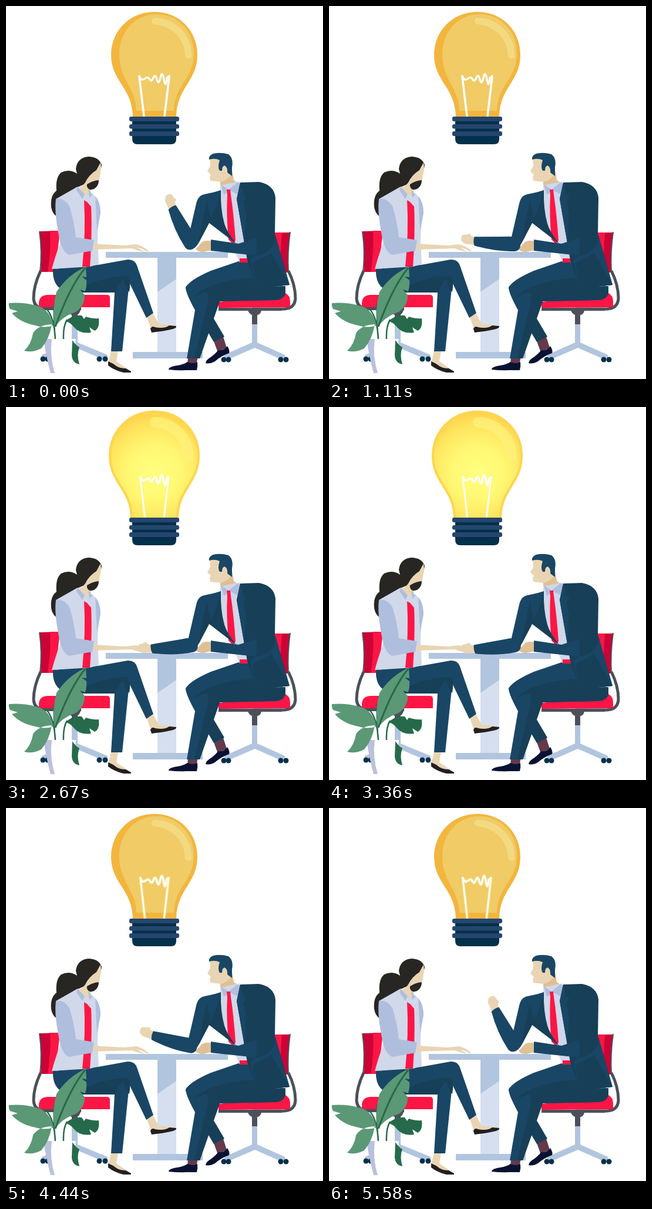
An HTML page for the animation above (5.61 s loop, 540 by 634 pixels).

```html
<!DOCTYPE html>
<html lang="en">
<head>
<meta charset="utf-8">
<title>Agreement</title>
<style>
html, body { margin: 0; width: 100%; height: 100%; overflow: hidden; background: #fff }
svg { display: block; width: 100%; height: 100% }
.navy { fill: #194665 } .deep { fill: #173f58 } .ink { fill: #03304a } .night { fill: #0a1232 }
.red { fill: #fd1645 } .wine { fill: #cb0336 }
.steel { fill: #b2c5df } .pale { fill: #d0d8ea } .shade { fill: #b0bedd }
.skin { fill: #e9d5b3 } .tan { fill: #dfc094 } .hair { fill: #272623 }
.gray { fill: #4b505a } .shoe { fill: #231f20 } .sock { fill: #633a4b }
.leaf { fill: #5b9876 } .dark { fill: #266a4b }
.frame { fill: none; stroke: #4b505a; stroke-width: 5; stroke-linejoin: round }
.edge { fill: none; stroke: #4b505a; stroke-width: 2 }
.wire { fill: none; stroke: #fff; stroke-linejoin: round; stroke-linecap: round }
</style>
</head>
<body>
<svg viewBox="0 0 540 634">
<defs>
  <path id="glass" d="M253 10C296 10 326 43 326 83C326 128 291 138 290 188H216C215 138 179 128 179 83C179 43 210 10 253 10Z"/>
  <path id="shine" d="M252 20C289 20 319 51 316 88Q311 92 305 87C305 56 284 34 251 31Q244 25 252 20Z"/>
  <path id="legs" d="M235 187L227 120M278 120L270 187"/>
  <path id="coil" d="M227 119Q230 126 233 125T239 122T245 125T251 122T257 125T263 122T269 125T274 122L278 119"/>
  <radialGradient id="glow" gradientUnits="userSpaceOnUse" cx="253" cy="112" r="98">
    <stop offset="0" stop-color="#ffff80"/><stop offset=".45" stop-color="#fff873"/>
    <stop offset=".8" stop-color="#ffe65f"/><stop offset="1" stop-color="#fed64f"/>
  </radialGradient>
</defs>

<!-- table -->
<path class="steel" d="M216 588H335V599H216Z"/>
<path fill="#d5dfef" d="M258 428H290V588H258Z"/>
<path class="steel" d="M170 418H378V428H290V464L258 486V428H170Z"/>

<!-- left chair -->
<path class="wine" d="M57 383L91 382L84 452H59Q62 418 57 383Z"/>
<path class="red" d="M75 382H92L84 452H71Q77 416 75 382Z"/>
<path class="edge" d="M57 383Q62 418 58 452"/>
<path class="frame" d="M59 450Q47 475 47 497Q48 514 66 514.500H128"/>
<path class="red" d="M56 512V504Q57 492 70 491H172Q177 491 177 496V512Z"/>
<path class="gray" d="M90 512H128Q126 526 117 526Q108 526 105 517H90ZM112 524H122V543H112Z"/>
<path class="steel" d="M112 541H122V572L173 593V599H162L117 580L72 599H61V593L112 572Z"/>
<g class="ink"><circle cx="63" cy="600" r="4.500"/><circle cx="71" cy="600" r="4.500"/><circle cx="159" cy="600" r="4.500"/><circle cx="169" cy="600" r="4.500"/></g>

<!-- right chair -->
<path class="red" d="M456 385H484Q479 420 481 453H460Z"/>
<path class="wine" d="M470 385H484Q479 420 481 453H468Q467 420 470 385Z"/>
<path class="edge" d="M484 384Q479 420 481 453"/>
<path class="frame" d="M481 450Q493 474 493 497Q492 514 474 515H420"/>
<path class="red" d="M362 513V503L400 499L476 488Q484 492 484 502V512Z"/>
<path class="gray" d="M362 513H470V518H435Q433 526 424 526Q416 526 412 518H362ZM419 524H428V543H419Z"/>
<path class="steel" d="M419 541H428V572L475 593V599H465L424 581L382 599H372V593L419 572Z"/>
<g class="ink"><circle cx="371" cy="601" r="4.500"/><circle cx="379" cy="601" r="4.500"/><circle cx="468" cy="601" r="4.500"/><circle cx="477" cy="601" r="4.500"/></g>

<!-- woman: legs -->
<path class="skin" d="M240 529L251 523L260 540L288 543L286 548L247 549ZM179 586H191L188 604L208 618L200 621L174 607Z"/>
<path class="shoe" d="M246 549Q248 543 254 546Q270 549 278 543L290 544Q291 548 280 550Q260 554 248 555ZM174 604Q182 607 188 612Q194 616 204 616L213 621V623H200Q184 619 174 611Z"/>
<path class="navy" d="M80 447L157 440L207 431Q219 430 223 441L251 522L239 530L210 470L198 587H179L185 487H110Q78 482 80 447Z"/>
<path class="deep" d="M120 487Q145 463 203 459Q212 458 211 478L210 486L206 482L200 465Q190 470 186 487Z"/>

<!-- woman: head -->
<path class="hair" d="M121 285Q108 276 94 283Q84 291 86 314Q75 322 77 342Q80 357 91 359Q85 340 89 329Q108 321 122 308L140 300Q162 285 163 270Q158 256 140 256Q121 258 119 277Z"/>
<path class="skin" d="M161 266Q163 277 161 283L158 299L145 312L143 335L133 328L124 308Q130 307 135 300Q141 287 154 279Z"/>
<path class="hair" d="M138 303Q147 297 158 296Q158 306 150 311Q142 314 139 309Q137 306 138 303Z"/>

<!-- woman: jacket -->
<path class="pale" d="M85 328L122 307L134 322L147 318Q161 333 161 352Q156 375 156 398L158 439L143 443L78 447Q84 425 94 397Z"/>
<path class="shade" d="M122 307L134 320L130 328L120 313ZM140 311L147 321L142 326ZM152 323Q161 333 161 352L155 382Z"/>
<path class="red" d="M133 330L138 333L145 341Q147 385 143 443H130Q136 385 133 330Z"/>
<path class="skin" d="M149 404L202 407L222 405Q236 409 243 417L239 417Q231 411 224 411L236 418Q224 416 214 412L149 414Z"/>
<path class="shade" d="M85 328Q98 325 108 340Q116 365 119 393L150 398L147 416L108 423Q95 419 90 390Q82 350 85 328Z"/>

<!-- man: legs -->
<path class="sock" d="M354 570L370 562L376 581L361 589ZM310 596H327L324 610H309Z"/>
<path class="night" d="M377 578Q382 586 380 590Q366 595 356 604Q347 609 340 607Q340 602 350 596Q358 590 361 585Q371 587 377 578ZM326 605Q327 612 325 619H306Q294 620 277 618Q277 613 292 611Q303 609 309 605Q318 609 326 605Z"/>
<path class="deep" d="M306 478Q318 473 342 490L352 528L372 562L354 571Q328 528 314 500Q307 488 306 478Z"/>
<path class="navy" d="M306 478Q314 465 349 450L396 434H418L430 478L476 476V488Q473 500 456 500L364 502L330 599H308L322 517Q307 490 306 478Z"/>
<path class="deep" d="M318 495Q350 466 420 462L432 478L476 476V488Q473 500 456 500L364 502L330 599H321L343 506Q348 485 338 487Z"/>

<!-- man: head -->
<path class="tan" d="M365 282H386L388 296L396 301L379 312L365 304Z"/>
<path class="skin" d="M347 258L379 262L386 284Q378 296 366 299L348 297L347 290L349 287L343 281L348 272Z"/>
<path class="navy" d="M346 261Q345 254 353 251Q365 248 379 252Q388 259 385 274V289L377 283Q378 274 372 271Q368 274 368 280H364Q360 274 364 262Q356 258 346 261Z"/>
<path class="skin" d="M369 273Q376 271 375 279Q373 285 368 283Z"/>

<!-- man: body -->
<path class="pale" d="M365 305L398 298L408 370L413 436H398L366 360Z"/>
<path class="red" d="M398 429H414V436H398Z"/>
<path class="shade" d="M366 303L379 312L394 300L399 303L394 320L381 313L371 321Z"/>
<path class="red" d="M376 312H382L383 321Q388 355 391 398L387 405L379 397Q375 355 377 322Z"/>
<path class="deep" d="M399 300L431 299Q457 304 459 326L458 388L483 474L428 480L411 432L406 403L393 328Z"/>
<path class="navy" d="M399 300L405 321L410 325L404 332L409 354L406 403L393 328ZM416 432L459 389L483 474L428 480Z"/>
<path class="deep" d="M420 437L452 420L483 474L428 480Z"/>
<path class="deep" d="M366 313L337 322Q325 350 345 368L392 404Q376 384 372 370Q365 345 366 313Z"/>
<path class="navy" d="M366 314L338 320Q327 322 324 336L311 392Q310 406 318 412Q325 410 329 401L347 366Q360 340 366 314Z"/>
<path class="deep" d="M342 331L349 362L345 371L328 403Q333 374 342 331Z"/>
<path class="tan" d="M323 413L334 401Q342 397 350 400V415L336 418Q326 418 323 413Z"/>
<path class="navy" d="M349 397L396 404L440 390L452 406Q442 424 425 424L349 416Z"/>
<path class="deep" d="M425 391Q442 370 457 360L458 400Q448 424 425 424Q430 408 425 391Z"/>

<!-- man: moving forearm -->
<g id="arm">
  <path class="skin" d="M249 398L242 396L239 392L234 394L227 395Q223 400 226 406L232 410L249 411Z"/>
  <path class="navy" d="M247 397L301 393Q322 390 326 402Q327 409 325 412Q322 417 316 417Q284 420 248 412Q245 405 247 397Z"/>
</g>

<!-- plant -->
<path fill="#fff" d="M64 566H119L113 624H76Z"/>
<path fill="#bac1dd" d="M64 566H78Q74 595 83 624H76Q68 595 64 566Z"/>
<path fill="none" stroke="#266a4b" stroke-width="2.500" d="M70 516Q82 530 84 566M82 505Q81 540 84 566M104 533Q97 545 98 566"/>
<path class="leaf" d="M5 505Q30 503 54 510Q74 515 81 543Q66 548 50 543Q24 538 10 522L20 519L7 515Q4 510 5 505ZM78 541Q55 542 46 556Q43 575 31 586Q45 590 60 582Q74 566 78 541Z"/>
<path class="leaf" d="M136 443Q105 457 86 486Q78 515 83 546Q95 528 119 520Q135 508 134 491L126 482L135 485Q138 475 137 466L129 460L137 461Z"/>
<path fill="none" stroke="#266a4b" stroke-width="3" d="M135 445Q108 478 84 545"/>
<path class="dark" d="M101 536Q114 524 129 526L133 532L136 528Q149 532 158 531Q160 548 151 552L142 546L145 555Q126 558 116 546Q109 537 101 536ZM113 568Q119 577 125 580Q120 593 125 609Q113 607 112 594Z"/>

<!-- bulb -->
<use href="#glass" fill="#f2b63e"/>
<path fill="#f0cb66" d="M256 14C293 14 320 43 320 80C320 125 287 133 286 178H222C222 140 193 126 193 82C193 43 220 14 256 14Z"/>
<use href="#shine" fill="#f3da80"/>
<g id="lit">
  <use href="#glass" fill="none" stroke="#fed54f" stroke-width="8"/>
  <use href="#glass" fill="url(#glow)"/>
  <use href="#shine" fill="#fff27c" stroke="#fff27c" stroke-width="6" stroke-linejoin="round" opacity=".75"/>
</g>
<g id="wire" class="wire">
  <g id="halo" stroke="#fff3a8" stroke-width="5.500"><use href="#legs"/><use href="#coil"/></g>
  <use id="stems" href="#legs"/>
  <use href="#coil" stroke-width="3.300"/>
</g>
<path class="ink" d="M215 188H290V226Q290 235 281 235H224Q215 235 215 226Z"/>
<g fill="#25466f"><rect x="210" y="188" width="85" height="8" rx="3"/><rect x="210" y="201" width="85" height="7.500" rx="3"/><rect x="210" y="213" width="85" height="8" rx="3"/></g>
</svg>
<script>
const LOOP = 5610, UP = 62, MEET = -6;
const $ = id => document.getElementById(id);
const ramp = (t, from, to) => Math.min(1, Math.max(0, (t - from) / (to - from)));
const shake = t => -5.5 + 2 * Math.sin((t - 2010) / 450 * 2 * Math.PI + 3.4);

function armAngle(t) {
  if (t < 1300) return UP + (MEET - UP) * t / 1300;
  const start = 4290, held = shake(Math.min(t, start));
  const joined = MEET + (held - MEET) * ramp(t, 1300, 1420);
  return joined + (UP - joined) * ramp(t, start, 4770);
}

function draw(now) {
  const t = now % LOOP;
  $('arm').setAttribute('transform', `rotate(${armAngle(t)} 317 403)`);
  $('lit').setAttribute('opacity', ramp(t, 1770, 1890) - ramp(t, 4290, 4410));

  // once lit, the filament stays hot: thinner, narrower and trembling
  const hot = ramp(t, 1770, 1890);
  const sway = hot * Math.sin(t / 70);
  const narrow = 1 - 0.06 * hot;
  $('wire').setAttribute('transform', `translate(${253 * (1 - narrow) + sway * 0.7} 0) scale(${narrow} 1)`);
  $('halo').setAttribute('opacity', hot * 0.5);
  $('stems').setAttribute('stroke-width', 3.6 - hot);
  requestAnimationFrame(draw);
}
requestAnimationFrame(draw);
</script>
</body>
</html>
```
